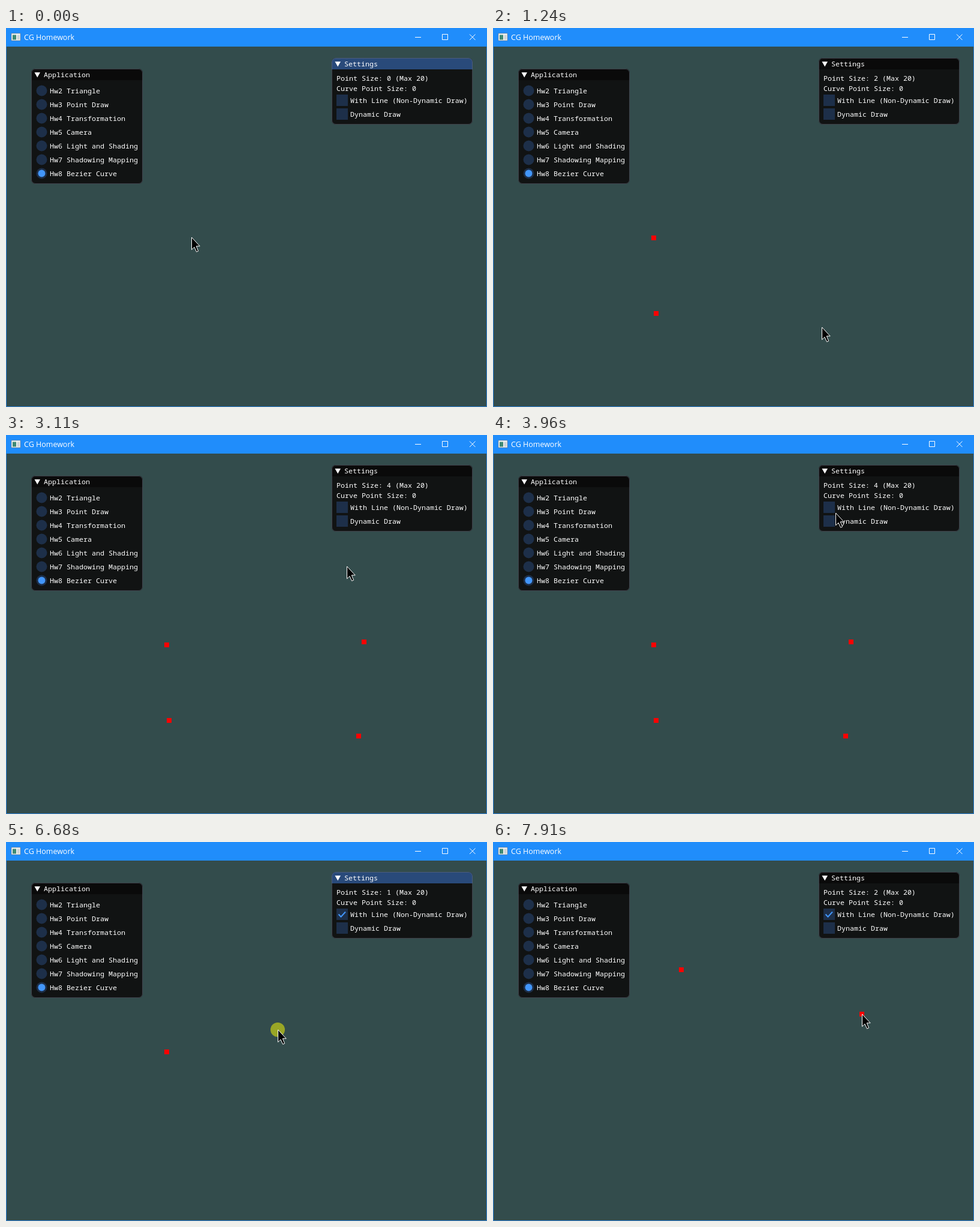
An HTML page for the animation above (7.99 s loop, 802 px wide and 632 px high).

```html
<!DOCTYPE html>
<html lang="en">
<head>
<meta charset="utf-8">
<title>CG Homework</title>
<style>
  html, body { margin: 0; width: 100%; height: 100%; overflow: hidden; background: #334c4c; }
  svg { display: block; width: 802px; height: 632px; }
  text { fill: #fff; white-space: pre; font: 11.667px "Noto Sans Mono", "DejaVu Sans Mono", monospace; }
  .caption { font: 12.5px "Open Sans", "Noto Sans", sans-serif; }
  .crisp { shape-rendering: crispEdges; }
  .frame { fill: #1d2f49; }
  .accent { fill: #4296fa; }
</style>
</head>
<body>
<svg viewBox="0 0 802 632">
  <rect width="802" height="632" fill="#334c4c"/>
  <path id="points" class="crisp" fill="#f00"/>
  <polyline id="lines" class="crisp" fill="none" stroke="#00f"/>
  <g id="panels"></g>

  <path d="M.5 30V631.5H801.5V30" fill="none" stroke="#2f83d6"/>
  <rect width="802" height="31" fill="#208dfb"/>
  <rect x="9" y="9" width="15" height="12" fill="#f2f4f4" stroke="#777" stroke-width=".6"/>
  <rect x="11" y="11.500" width="6" height="8" fill="#3f8a74"/>
  <rect x="18.500" y="11.500" width="4" height="8" fill="#ccd3d6"/>
  <text class="caption" x="30" y="20">CG Homework</text>
  <path d="M682 15.500h10M727.500 10.500h9v9h-9zM773 10.500l9.500 9.500M782.500 10.500l-9.500 9.500" fill="none" stroke="#fff"/>

  <circle id="press" r="12" fill="#ff0" fill-opacity=".5"/>
  <path id="cursor" d="M.5 0V20.700L5 16.400L8.600 24.300L11.600 23L8.300 14.800H14.200z" fill="#000" stroke="#fff"/>
</svg>
<script>
const LOOP = 7990, TICK = 77.6, LAST_TICK = 102;
const ROW = 23, BOX = 19;
const $ = id => document.getElementById(id);
const show = (node, on) => node.setAttribute("visibility", on ? "visible" : "hidden");

function svg(tag, attrs, text = "") {
  const node = document.createElementNS("http://www.w3.org/2000/svg", tag);
  for (const name in attrs) node.setAttribute(name, attrs[name]);
  node.textContent = text;
  return $("panels").appendChild(node);
}
const label = (x, y, text) => svg("text", { x, y }, text);

// Draws a rounded window and returns its title bar.
function panel(x, y, width, height, title) {
  svg("rect", { x, y, width, height, rx: 7, fill: "#111313" });
  const header = svg("path", {
    d: `M${x} ${y + 19}v-12a7 7 0 0 1 7-7h${width - 14}a7 7 0 0 1 7 7v12z`, fill: "#0a0a0a"
  });
  svg("rect", {
    x: x + .5, y: y + .5, width: width - 1, height: height - 1, rx: 6.5,
    fill: "none", stroke: "#6e6e80", "stroke-opacity": .5
  });
  svg("path", { d: `M${x + 5.5} ${y + 6}h9.5l-4.75 8.5z`, fill: "#fff" });
  label(x + 21, y + 14, title);
  return header;
}

panel(42, 68, 186, 192, "Application");
const homework = ["Triangle", "Point Draw", "Transformation", "Camera",
  "Light and Shading", "Shadowing Mapping", "Bezier Curve"];
homework.forEach((name, i) => {
  const cy = 104.5 + ROW * i;
  svg("circle", { class: "frame", cx: 59.5, cy, r: 9 });
  if (i === homework.length - 1) svg("circle", { class: "accent", cx: 59.5, cy, r: 6 });
  label(73, cy + 4.5, `Hw${i + 2} ${name}`);
});

const settings = { x: 543, y: 50, width: 235, height: 111 };
const header = panel(settings.x, settings.y, settings.width, settings.height, "Settings");
const countLabel = label(551, 88, "");
label(551, 105, "Curve Point Size: 0");
const boxes = ["With Line (Non-Dynamic Draw)", "Dynamic Draw"].map((text, i) => {
  const x = 551, y = 111 + ROW * i;
  label(x + BOX + 4, y + 14, text);
  const node = svg("rect", { x, y, width: BOX, height: BOX });
  return { node, x, y, width: BOX + 4 + 7 * text.length, height: BOX };
});
const check = svg("path", { d: "M554.5 120.5l4 4.2l7.5-8.2", fill: "none", stroke: "#4296fa", "stroke-width": 2 });

// Where the mouse goes, in ticks, and when it is clicked there.
const stops = [
  { leave: 0, arrive: 0, x: 309, y: 349 },
  { leave: 0, arrive: 5, x: 268, y: 350, clicks: [5] },
  { leave: 6, arrive: 12, x: 272, y: 476, clicks: [12], hold: 2 },
  { leave: 14, arrive: 17.1, x: 588, y: 502, clicks: [18], hold: 2 },
  { leave: 20, arrive: 25, x: 597, y: 345, clicks: [25] },
  { leave: 32, arrive: 43, x: 566, y: 209 },
  { leave: 43, arrive: 48, x: 563, y: 136 },
  { leave: 49, arrive: 51, x: 571, y: 130 },
  { leave: 56, arrive: 59, x: 560, y: 121, clicks: [59], hold: 2 },
  { leave: 63, arrive: 67, x: 506, y: 210, clicks: [67], hold: 2, right: true },
  { leave: 73, arrive: 76, x: 453, y: 313, clicks: [81, 84, 86, 90], right: true },
  { leave: 90, arrive: 94, x: 314, y: 213, clicks: [94] },
  { leave: 95, arrive: 101, x: 615, y: 287, clicks: [101] }
];

const inside = (p, box) =>
  p.x >= box.x && p.x < box.x + box.width && p.y >= box.y && p.y < box.y + box.height;

function mouseAt(tick) {
  const i = Math.max(1, stops.filter(stop => stop.leave <= tick).length - 1);
  const from = stops[i - 1], to = stops[i];
  const rest = 1 - Math.min(1, (tick - to.leave) / (to.arrive - to.leave));
  const ease = 1 - rest * rest;
  const mix = axis => Math.round(from[axis] + (to[axis] - from[axis]) * ease);
  return { x: mix("x"), y: mix("y") };
}

// Replays the clicks: left adds a point, right removes the last one.
function stateAt(tick) {
  const state = { points: [], focused: true, checked: false, pressed: false };
  for (const stop of stops) {
    const { clicks = [], hold = 1, right } = stop;
    for (const click of clicks.filter(start => start <= tick)) {
      if (right) {
        state.points.pop();
      } else {
        state.points.push(stop);
        state.focused = inside(stop, settings);
        if (inside(stop, boxes[0]) && tick > click) state.checked = true;
      }
      state.pressed = tick < click + hold;
    }
  }
  return state;
}

function render(time) {
  const tick = Math.min(LAST_TICK, Math.floor((time % LOOP + 12) / TICK));
  const mouse = mouseAt(tick);
  const { points, focused, checked, pressed } = stateAt(tick);
  const joined = checked && points.length > 2;

  $("points").setAttribute("d", points.map(p => `M${p.x - 4} ${p.y - 4}h8v8h-8z`).join(""));
  $("lines").setAttribute("points", joined ? points.map(p => `${p.x},${p.y}`).join(" ") : "");
  countLabel.textContent = `Point Size: ${points.length} (Max 20)`;
  header.setAttribute("fill", focused ? "#294a7a" : "#0a0a0a");
  show(check, checked);
  for (const box of boxes) {
    box.node.setAttribute("fill", !inside(mouse, box) ? "#1d2f49" : pressed && !checked ? "#326bae" : "#25476f");
  }
  for (const id of ["cursor", "press"]) {
    $(id).setAttribute("transform", `translate(${mouse.x} ${mouse.y})`);
  }
  show($("press"), pressed);
}

const began = performance.now();
function loop() {
  render(performance.now() - began);
  requestAnimationFrame(loop);
}
loop();
</script>
</body>
</html>
```
